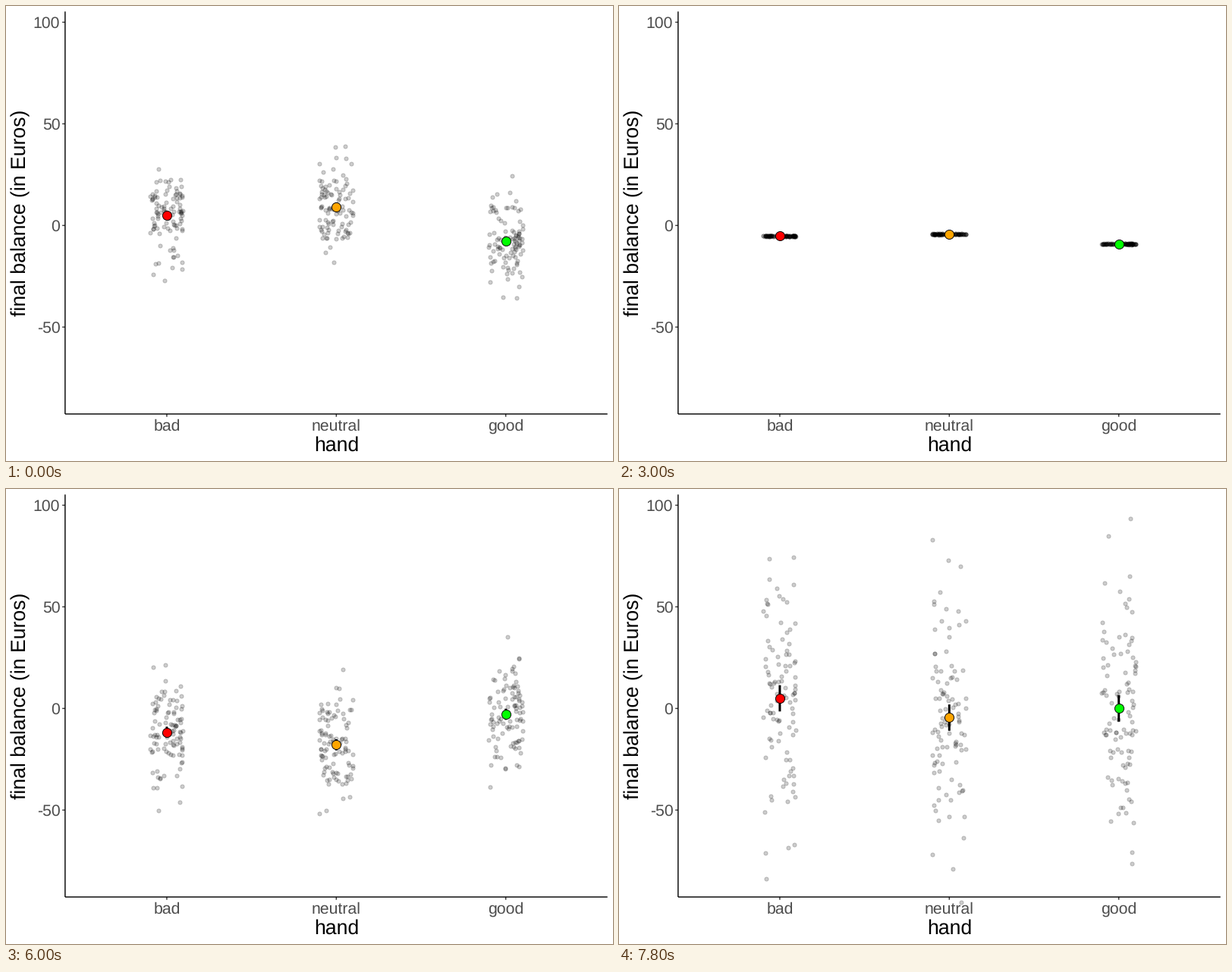
Animation of 800x600 px, one loop 8 s. Source, as a matplotlib script:

```python
import numpy as np
import matplotlib.pyplot as plt
from matplotlib.animation import FuncAnimation

W, H, DPI = 800, 600, 100
PX = 72 / DPI  # points per pixel
N = 100
TICK_MS, TICKS_PER_ROUND = 200, 3

HANDS = ["bad", "neutral", "good"]
COLORS = ["#ff0000", "#ffa500", "#00ff00"]

LEFT, RIGHT, TOP, BOTTOM = 77.9, 792.7, 7.3, 538.0
STEP = (RIGHT - LEFT) / 3.2
CENTERS = LEFT + STEP * np.array([0.6, 1.6, 2.6])
LINE, TICK = 1.42, 3.7
TITLE_SIZE, LABEL_SIZE = 26.67, 21.33
GREY = "#4d4d4d"

# Spread of the balances per round, and their means at a few key rounds
SPREAD = [11.5, 13, 9, 8, 9, 0.15, 4, 2.3, 5.5, 16, 14, 17, 17, 33]
KEY_ROUNDS = [0, 3, 5, 7, 9, 11, 13]
KEY_MEANS = {
    "bad": [5, -8, -5.2, -1.2, -14.6, -8.8, 5],
    "neutral": [9.1, -10.6, -4.3, -0.4, -10.6, -25.2, -4.5],
    "good": [-7.8, 2.2, -9.1, -8.5, -5.4, -0.3, 0],
}

rng = np.random.default_rng(12)
JITTER = rng.uniform(-0.1, 0.1, (3, N)) * STEP


def to_y(value):
    return 289.4 - 2.68 * np.asarray(value)


def make_balances(rnd, hand):
    z = rng.normal(size=N)
    z = (z - z.mean()) / z.std()
    return np.interp(rnd, KEY_ROUNDS, KEY_MEANS[hand]) + SPREAD[rnd] * z


BALANCES = [[make_balances(rnd, hand) for hand in HANDS]
            for rnd in range(len(SPREAD))]

plt.rcParams.update({
    "font.family": "Liberation Sans",
    "text.hinting": "none",
    "path.snap": False,
})
fig = plt.figure(figsize=(W / DPI, H / DPI), dpi=DPI, facecolor="white")
ax = fig.add_axes([0, 0, 1, 1])
ax.set_xlim(0, W)
ax.set_ylim(H, 0)
ax.axis("off")


def line(x, y, color="black", width=LINE, **kw):
    return ax.plot(x, y, color=color, lw=width * PX,
                   solid_capstyle="butt", **kw)[0]


def text(x, y, label, size, color="black", ha="center", **kw):
    ax.text(x, y, label, fontsize=size * PX, color=color, ha=ha,
            va="baseline", **kw)


def draw_axes():
    for value in (100, 50, 0, -50):
        y = float(to_y(value))
        line([LEFT - TICK, LEFT], [y, y], "#333333")
        text(LEFT - 6.6, y + 7.7, str(value), LABEL_SIZE, GREY, "right")
    for x, hand in zip(CENTERS, HANDS):
        line([x, x], [BOTTOM, BOTTOM + TICK], "#333333")
        text(x, 560, hand, LABEL_SIZE, GREY)
    line([LEFT, LEFT], [TOP, BOTTOM])
    line([LEFT, RIGHT], [BOTTOM, BOTTOM])
    text((LEFT + RIGHT) / 2, 587, "hand", TITLE_SIZE)
    text(26.3, (TOP + BOTTOM) / 2, "final balance (in Euros)", TITLE_SIZE,
         rotation=90, rotation_mode="anchor")


draw_axes()
clouds = [ax.scatter(x + jitter, np.zeros(N), s=(5.2 * PX) ** 2,
                     lw=0.94 * PX, facecolor=(0, 0, 0, 0.2),
                     edgecolor=(0, 0, 0, 0.2), zorder=3)
          for x, jitter in zip(CENTERS, JITTER)]
bars = [line([x, x], [0, 0], width=3, zorder=4) for x in CENTERS]
dots = [ax.plot([x], [0], "o", ms=12.1 * PX, mfc=color, mec="black",
                mew=0.94 * PX, zorder=5)[0]
        for x, color in zip(CENTERS, COLORS)]


def update(tick):
    balances = BALANCES[tick // TICKS_PER_ROUND]
    for h, values in enumerate(balances):
        mean = values.mean()
        error = 1.96 * values.std() / np.sqrt(N)
        clouds[h].set_offsets(
            np.column_stack([CENTERS[h] + JITTER[h], to_y(values)]))
        bars[h].set_ydata(to_y([mean - error, mean + error]))
        dots[h].set_ydata([to_y(mean)])
    return clouds + bars + dots


anim = FuncAnimation(fig, update, frames=len(SPREAD) * TICKS_PER_ROUND - 2,
                     interval=TICK_MS, init_func=lambda: update(0),
                     repeat=True, repeat_delay=0, blit=False)
plt.show()
```
